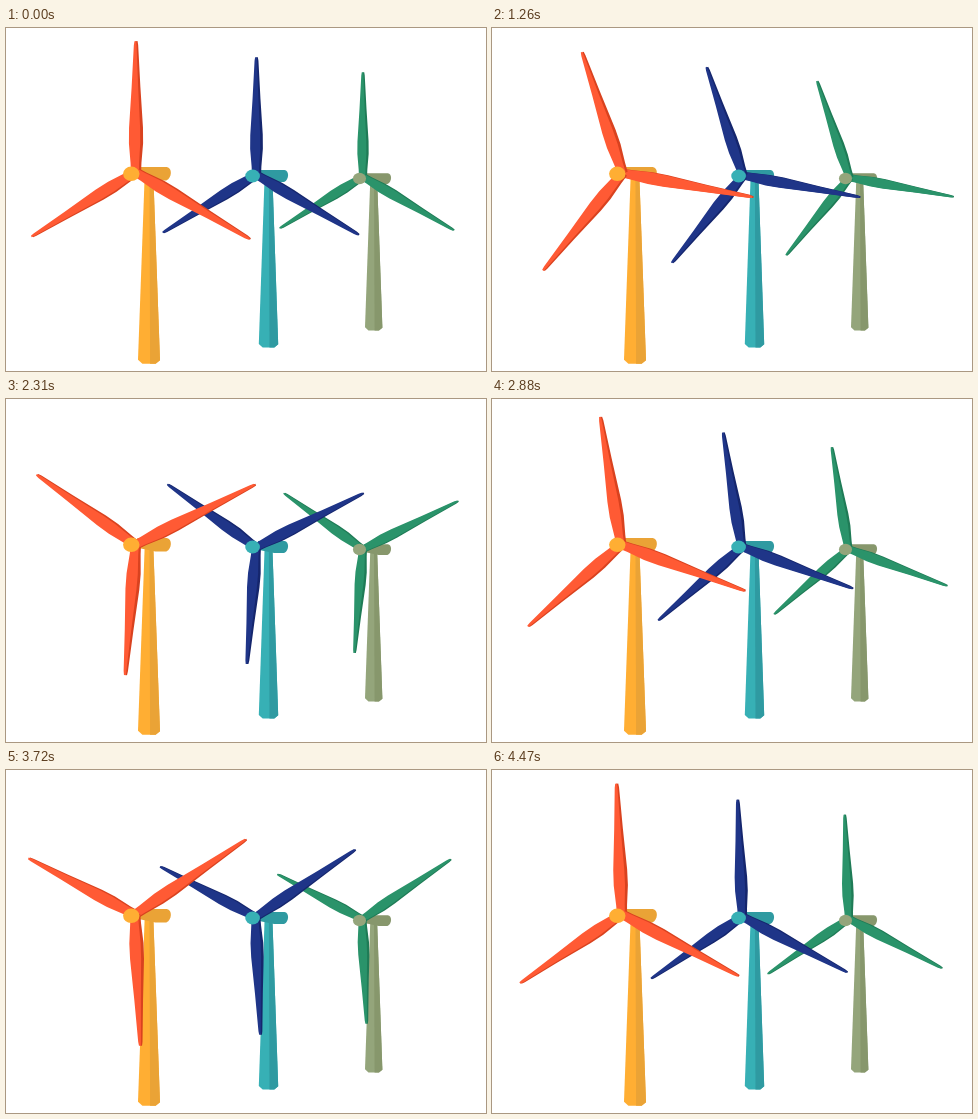
Recreate the animation shown at these times as an HTML page with a canvas. Size 480 px wide and 343 px high, loop 4500 ms.

```html
<!DOCTYPE html>
<html lang="en">
<head>
<meta charset="utf-8">
<title>Wind turbines</title>
<style>
  html, body { margin: 0; width: 100%; height: 100%; overflow: hidden; background: #fff; }
  canvas { display: block; width: 480px; height: 343px; }
</style>
</head>
<body>
<canvas id="stage" width="480" height="343"></canvas>
<script>
const ctx = document.getElementById('stage').getContext('2d');
const LOOP = 4500, STEP = 30, STEPS = LOOP / STEP;

// Listed from the farthest to the nearest; radius is the blade length.
const turbines = [
  { x: 357, y: 149.5, radius: 104.5, hub: [353.5, 150.5],
    tower: { x: 367.7, top: 154, bottom: 302.5, topHalf: 3.5, baseHalf: 8.7 },
    blade: '#2a936a', bladeSide: '#1f7b56', light: '#94a57b', shade: '#87976c' },
  { x: 250.5, y: 147.5, radius: 117.5, hub: [246.6, 148],
    tower: { x: 262.5, top: 152, bottom: 319.5, topHalf: 4, baseHalf: 9.7 },
    blade: '#1f3588', bladeSide: '#15266d', light: '#37b0b5', shade: '#2f9aa1' },
  { x: 130, y: 145, radius: 131, hub: [125.3, 145.8],
    tower: { x: 143, top: 150, bottom: 335.7, topHalf: 4.4, baseHalf: 11 },
    blade: '#ff5a34', bladeSide: '#d9421f', light: '#ffae33', shade: '#eaa336' }
];

// Blade outline: distance along the blade, half width, side thickness.
const profile = [
  [0, 0.032, 0.016], [0.07, 0.034, 0.018], [0.22, 0.045, 0.022],
  [0.34, 0.044, 0.022], [0.65, 0.026, 0.017], [0.97, 0.011, 0.012], [1, 0.007, 0.01]
];
const OFFSET = 0.0068; // the rotor sits slightly off its axle

function polygon(points, color) {
  ctx.beginPath();
  points.forEach(([x, y]) => ctx.lineTo(x, y));
  ctx.closePath();
  ctx.fillStyle = color;
  ctx.fill();
}

// Maps a point of the rotor plane to the screen in perspective.
function project(t, u, v, shift) {
  const depth = 1 - 0.052 * u;
  return [
    t.x + t.radius * (0.958 * u / depth + shift),
    t.y - t.radius * (v / depth + 0.015 * u)
  ];
}

function drawBlade(t, rotation, index) {
  const angle = rotation + index * Math.PI * 2 / 3;
  const sin = Math.sin(angle), cos = Math.cos(angle);
  const du = OFFSET * Math.sin(rotation), dv = OFFSET * Math.cos(rotation);
  const outline = side => {
    const edge = sign => profile.map(([r, half, thick]) => {
      const w = sign * half;
      return project(t, r * sin + w * cos + du, r * cos - w * sin + dv, side * thick / 2);
    });
    return edge(-1).concat(edge(1).reverse());
  };
  polygon(outline(1), t.bladeSide);
  polygon(outline(-1), t.blade);
}

function drawTower(t) {
  const { x, top, bottom, topHalf, baseHalf } = t.tower;
  const k = t.radius / 131;
  polygon([
    [x - topHalf, top], [x + topHalf, top],
    [x + baseHalf, bottom - 3.5 * k], [x + baseHalf * 0.6, bottom],
    [x - baseHalf * 0.6, bottom], [x - baseHalf, bottom - 4 * k]
  ], t.light);
  polygon([
    [x + topHalf * 0.1, top], [x + topHalf, top],
    [x + baseHalf, bottom - 3.5 * k], [x + baseHalf * 0.6, bottom], [x + baseHalf * 0.1, bottom]
  ], t.shade);
}

function drawNacelle(t) {
  const k = t.radius / 131;
  const [hx, hy] = t.hub;
  const px = n => hx + n * k, py = n => hy + n * k;
  ctx.beginPath();
  ctx.moveTo(px(6), py(-6.7));
  ctx.lineTo(px(35.5), py(-6.7));
  ctx.bezierCurveTo(px(41), py(-6), px(41), py(4), px(35), py(6.8));
  ctx.lineTo(px(24), py(6.8));
  ctx.lineTo(px(6), py(3));
  ctx.closePath();
  ctx.fillStyle = t.shade;
  ctx.fill();
}

function drawHub(t) {
  const k = t.radius / 131;
  ctx.beginPath();
  ctx.ellipse(...t.hub, 8.2 * k, 7.2 * k, 0, 0, Math.PI * 2);
  ctx.fillStyle = t.light;
  ctx.fill();
}

function draw() {
  const step = Math.floor(performance.now() % LOOP / STEP);
  const rotation = step / STEPS * Math.PI * 2;
  ctx.fillStyle = '#fff';
  ctx.fillRect(0, 0, 480, 343);
  for (const t of turbines) {
    drawTower(t);
    drawNacelle(t);
    for (let i = 0; i < 3; i++) drawBlade(t, rotation, i);
    drawHub(t);
  }
  requestAnimationFrame(draw);
}
draw();
</script>
</body>
</html>
```
